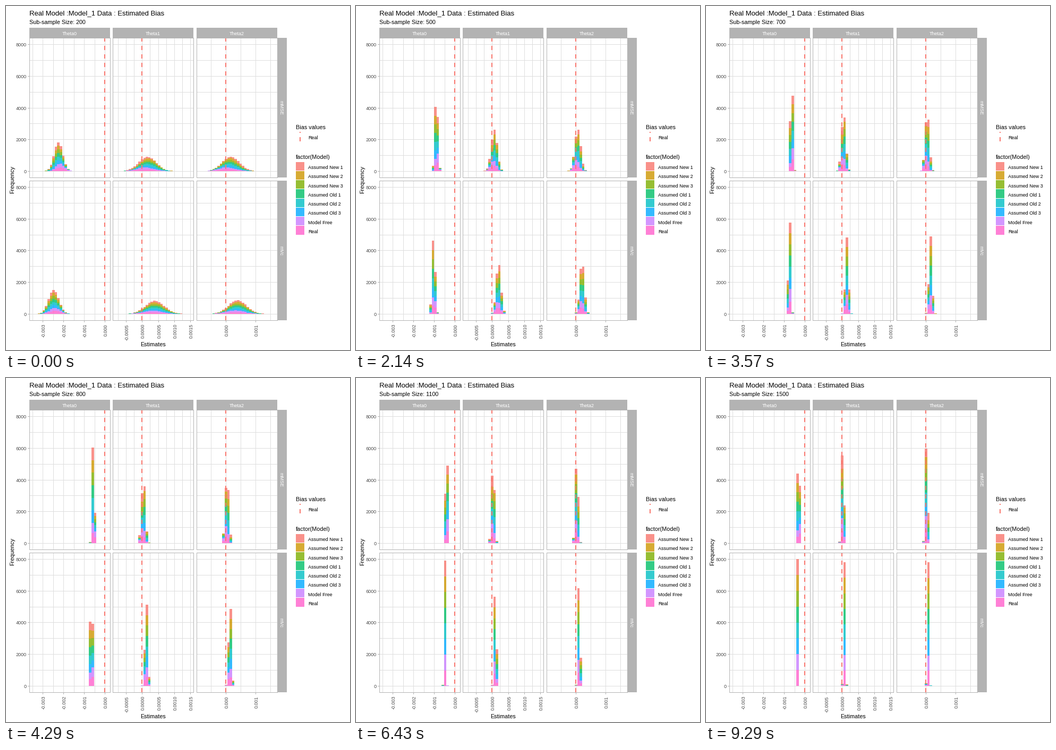
Write a matplotlib script that moves like this. It is 648 by 648 pixels and loops after 10000 ms.

```python
import math

import matplotlib.pyplot as plt
import numpy as np
from matplotlib.animation import FuncAnimation
from matplotlib.collections import PolyCollection
from matplotlib.patches import Rectangle

SIZE, DPI = 648, 72
LOOP, TICK = 10000, 100
SUBSAMPLES = range(200, 1501, 100)

GRID, GREY, TEXT, RED = "#dedede", "#b3b3b3", "#4d4d4d", "#f8766d"
MODELS = ["Assumed New 1", "Assumed New 2", "Assumed New 3", "Assumed Old 1",
          "Assumed Old 2", "Assumed Old 3", "Model Free", "Real"]
COLORS = ["#f8766d", "#cd9600", "#7cae00", "#00be67",
          "#00bfc4", "#00a9ff", "#c77cff", "#ff61cc"]

PW, PH = 152, 263         # panel size
BIN = PW / 1.1 / 30       # bin width in pixels
UNIT = PH / 1.1 / 8000    # pixels per count
ROWS = [("mMSE", 60), ("mVc", 329)]

# name, left edge, x of zero, pixels per major step, major steps, step, decimals
COLS = [("Theta0", 44, 186.3, 38.95, range(-3, 1), 0.001, 3),
        ("Theta1", 201, 256.3, 30.35, range(-1, 4), 0.0005, 4),
        ("Theta2", 359, 414.2, 56.2, range(0, 2), 0.001, 3)]

# Per panel (row, column): the bias and spread, in bins, both shrink like
# (limit + extra * 200 / n) / n.  Pairs of (limit, extra).
FITS = {
    (0, 0): ((-3778, -12), (225, 120)),
    (0, 1): ((460, -20), (515, 195)),
    (0, 2): ((375, 25), (500, 190)),
    (1, 0): ((-4480, 300), (180, 236)),
    (1, 1): ((1540, -490), (270, 500)),
    (1, 2): ((1480, -530), (265, 470)),
}
# Offset of the first model, in spreads
FIRST = {(0, 1): -0.8, (0, 2): 0.6}

cdf = np.vectorize(lambda z: 0.5 * (1 + math.erf(z / math.sqrt(2))))

fig = plt.figure(figsize=(SIZE / DPI, SIZE / DPI), dpi=DPI, facecolor="white")
ax = fig.add_axes([0, 0, 1, 1])
ax.set_xlim(0, SIZE)
ax.set_ylim(SIZE, 0)
ax.axis("off")


def box(x, y, w, h, color, z=1, alpha=1):
    ax.add_patch(Rectangle((round(x), round(y)), w, h, fc=color, lw=0,
                           alpha=alpha, zorder=z))


def dashed(x, bottom, top):
    ax.plot([round(x)] * 2, [bottom, top], color=RED, lw=2, zorder=4,
            ls=(0, (4, 4)), dash_capstyle="butt")


def label(x, y, s, size=9, color="black", ha="left", rot=0):
    return ax.text(x, y, s, fontsize=size, color=color, ha=ha, va="baseline",
                   rotation=rot, rotation_mode="anchor",
                   family="Liberation Sans", zorder=6)


def baseline(top):
    return top + PH - PH / 22


def draw_panel(left, zero, gap, top):
    for k in range(9):
        box(left, baseline(top) - 1000 * k * UNIT, PW, 1, GRID)
    for k in range(-8, 9):
        x = zero + k * gap / 2
        if left < x < left + PW:
            box(x, top, 1, PH, GRID)
    dashed(zero, top + PH, top)
    for y in (top, top + PH):
        box(left, y, PW + 1, 1, GREY, z=5)
    for x in (left, left + PW):
        box(x, top, 1, PH + 1, GREY, z=5)


def draw_axes():
    for name, left, zero, gap, steps, step, digits in COLS:
        box(left, 41, PW, 19, GREY)
        label(left + PW / 2, 55, name, color="white", ha="center")
        for k in steps:
            x = zero + k * gap
            box(x, 592, 1, 4, GREY)
            label(x + 4.6, 599, f"{k * step:.{digits}f}", color=TEXT,
                  ha="right", rot=90)
    for name, top in ROWS:
        box(511, top, 18, PH, GREY)
        label(515, top + PH / 2, name, color="white", ha="center", rot=-90)
        for k in range(0, 9, 2):
            y = baseline(top) - 1000 * k * UNIT
            box(41, y, 3, 1, GREY)
            label(39, round(y) + 4, str(1000 * k), color=TEXT, ha="right")
    label(276.5, 641, "Estimates", 10.8, ha="center")
    label(15, 327, "Frequency", 11, ha="center", rot=90)


def draw_legend():
    label(546, 232, "Bias values", 10.9)
    dashed(554, 255, 237)
    label(569, 251, "Real")
    label(546, 288, "factor(Model)", 10.9)
    for i, (name, color) in enumerate(zip(MODELS, COLORS)):
        y = 294 + 17.28 * i
        top, bottom = int(y), int(y + 17.28) - 1
        box(546, top, 16, bottom - top, color, alpha=0.8)
        label(569, round(y + 13), name)


def bin_counts(key, n):
    """Counts per model (rows) and bin (columns)."""
    row, col = key
    mean, spread = ((limit + extra * 200 / n) / n
                    for limit, extra in FITS[key])
    shift = np.zeros(8)
    shift[6:] = (0.5, 0.3)[row] * (1 if col == 0 else -1)
    shift[0] = FIRST.get(key, 0)
    shift -= shift.mean()
    sd = spread / math.sqrt(1 + shift.var())
    bins = np.arange(-30, 22)
    edges = np.append(bins, 22) - 0.5
    z = (edges - mean - spread * shift[:, None]) / sd
    return bins, 1000 * np.diff(cdf(z), axis=1)


def stack(key, n):
    row, col = key
    zero = COLS[col][2]
    base = round(baseline(ROWS[row][1]))
    verts, fills = [], []
    bins, counts = bin_counts(key, n)
    for k, column in zip(bins, counts.T):
        x0, x1 = (round(zero + (k + s) * BIN) for s in (-0.5, 0.5))
        y0, total = base, 0
        for count, color in zip(column[::-1], COLORS[::-1]):
            total += count
            y1 = base - round(total * UNIT)
            if y1 < y0:
                verts.append([(x0, y0), (x1, y0), (x1, y1), (x0, y1)])
                fills.append(color)
            y0 = y1
    return verts, fills


def histograms(n):
    parts = [stack(key, n) for key in FITS]
    return sum((p[0] for p in parts), []), sum((p[1] for p in parts), [])


for _, left, zero, gap, *_ in COLS:
    for _, top in ROWS:
        draw_panel(left, zero, gap, top)
draw_axes()
draw_legend()
label(44, 17, "Real Model :Model_1 Data : Estimated Bias", 13.15)
subtitle = label(44, 34, "", 10.8)
bars = PolyCollection([], linewidths=0, alpha=0.8, zorder=3)
ax.add_collection(bars, autolim=False)
SCENES = [histograms(n) for n in SUBSAMPLES]


def update(i):
    # A tick shows the scene that is current at its end
    scene = ((i + 1) * TICK - 10) * len(SCENES) // LOOP
    verts, fills = SCENES[scene]
    bars.set_verts(verts)
    bars.set_facecolor(fills)
    subtitle.set_text(f"Sub-sample Size: {SUBSAMPLES[scene]}")
    return bars, subtitle


anim = FuncAnimation(fig, update, frames=LOOP // TICK, interval=TICK,
                     repeat=True, repeat_delay=0, blit=False)
plt.show()
```
